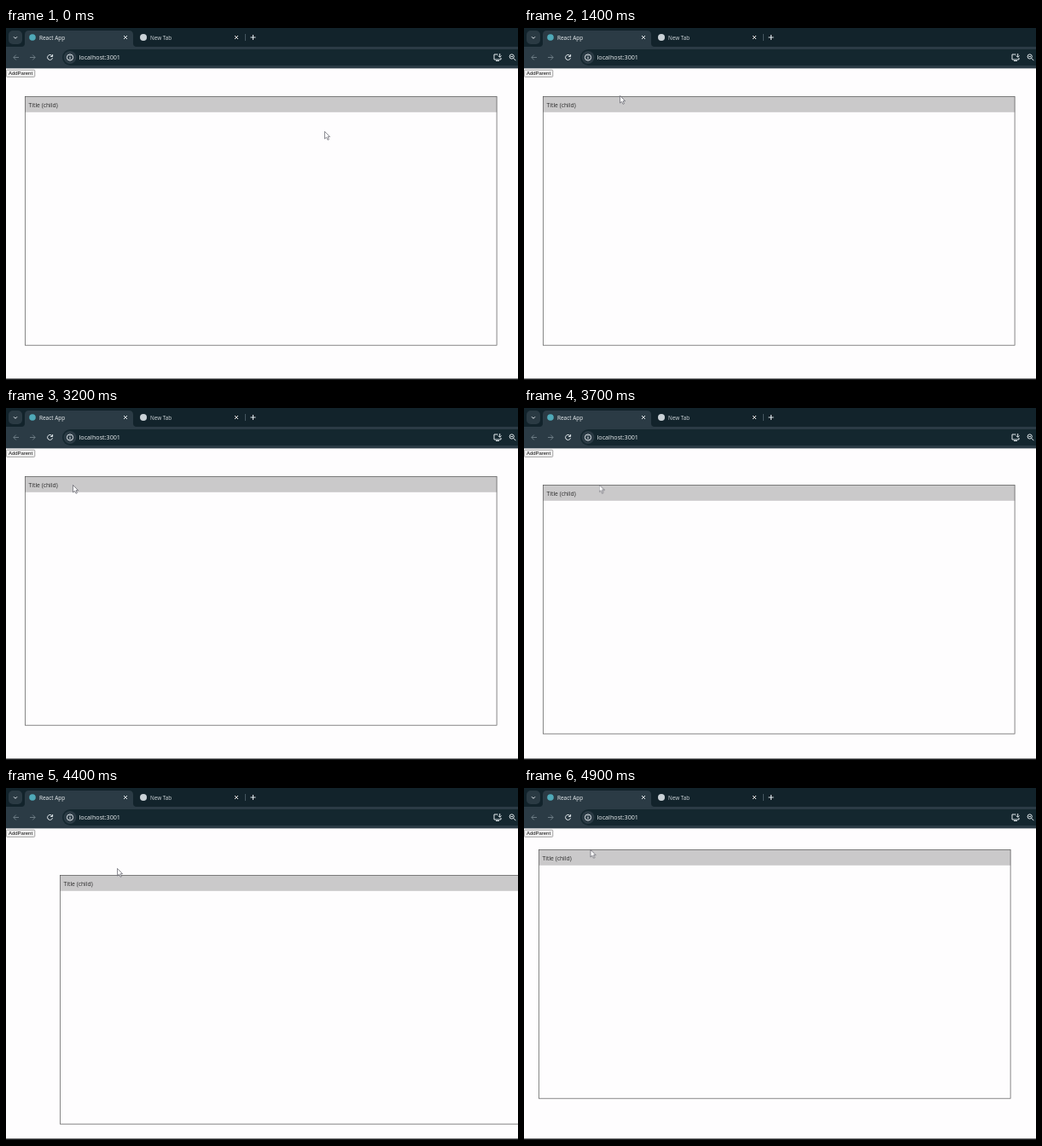
Write an HTML page that moves like this. It is 600 by 413 pixels and loops after 5 s.

```html
<!DOCTYPE html>
<html lang="en">
<head>
<meta charset="utf-8">
<title>Draggable window</title>
<style>
html, body { margin: 0; width: 100%; height: 100%; overflow: hidden; background: #fefdfe; }
svg { display: block; width: 600px; height: 413px; }
text { font-family: "Open Sans", "Noto Sans", sans-serif; }
.icon { fill: none; stroke: #e3eaee; stroke-width: 1; }
.dim { stroke: #6c7b84; }
#panel { animation: panel 5s step-end infinite; }
#cursor { animation: cursor 5s step-end infinite; }

/* 2% = one 100 ms step */
@keyframes panel {
  0%, 70% { transform: translate(22px, 80px); }
  72% { transform: translate(22px, 86px); }
  74% { transform: translate(22px, 90px); }
  76% { transform: translate(24px, 91px); }
  78% { transform: translate(28px, 92px); }
  80% { transform: translate(34px, 94px); }
  82% { transform: translate(41px, 98px); }
  84% { transform: translate(50px, 102px); }
  86% { transform: translate(58px, 104px); }
  88% { transform: translate(63px, 102px); }
  90% { transform: translate(61px, 94px); }
  92% { transform: translate(51px, 83px); }
  94% { transform: translate(37px, 74px); }
  96% { transform: translate(24px, 71px); }
  98%, 100% { transform: translate(17px, 72px); }
}
@keyframes cursor {
  0% { transform: translate(373px, 121px); }
  18% { transform: translate(369px, 120px); }
  20% { transform: translate(363px, 118px); }
  24% { transform: translate(320px, 106px); }
  26% { transform: translate(200px, 88px); }
  28% { transform: translate(112px, 79px); }
  30% { transform: translate(95px, 82px); }
  32% { transform: translate(87px, 86px); }
  34% { transform: translate(82px, 89px); }
  36% { transform: translate(80px, 91px); }
  38%, 64% { transform: translate(78px, 90px); }
  66% { transform: translate(79px, 88px); }
  68% { transform: translate(81px, 84px); }
  70% { transform: translate(82px, 84px); }
  72% { transform: translate(84px, 89px); }
  74% { transform: translate(87.5px, 89.5px); }
  76% { transform: translate(94px, 92px); }
  78% { transform: translate(101px, 95px); }
  80% { transform: translate(110px, 99px); }
  82% { transform: translate(117px, 102px); }
  84% { transform: translate(124px, 104px); }
  86% { transform: translate(129px, 101px); }
  88% { transform: translate(130px, 94px); }
  90% { transform: translate(123px, 84px); }
  92% { transform: translate(109px, 73px); }
  94% { transform: translate(94px, 67px); }
  96% { transform: translate(83px, 68px); }
  98%, 100% { transform: translate(77.5px, 72px); }
}
</style>
</head>
<body>
<svg viewBox="0 0 600 413">
  <defs>
    <path id="close" d="M-2-2 2 2M2-2-2 2"/>
  </defs>
  <rect width="600" height="413" fill="#fefdfe"/>

  <!-- tab strip -->
  <rect width="600" height="24" fill="#12232b"/>
  <rect x="3" y="3" width="16" height="16" rx="5" fill="#2a3a43"/>
  <path class="icon" d="M9 10.3l2 2 2-2"/>
  <path d="M18 22q4 0 4-4V8q0-5 5-5H144q5 0 5 5v10q0 4 4 4z" fill="#2b3b45"/>
  <circle cx="31" cy="11" r="3.8" fill="#4fa9b8"/>
  <text x="39" y="13.7" font-size="6.45" fill="#eef2f4">React App</text>
  <use href="#close" x="140" y="11" class="icon"/>
  <circle cx="161" cy="11" r="4" fill="#c9d1d6"/>
  <text x="169" y="13.7" font-size="6.3" fill="#d3dade">New Tab</text>
  <use href="#close" x="270" y="11" class="icon"/>
  <path d="M280.5 7v8" stroke="#465761"/>
  <path class="icon" d="M289.5 8v6M286.5 11h6"/>

  <!-- toolbar -->
  <rect y="22" width="600" height="25.4" fill="#2b3b45"/>
  <path class="icon dim" d="M15 34.5H9M11.8 31.5l-3 3 3 3M28 34.5h6M31.2 31.5l3 3-3 3"/>
  <path class="icon" d="M54.3 33.2a3 3 0 1 0 .2 2M54.6 31v2.5h-2.5"/>
  <rect x="66" y="25" width="560" height="19" rx="9.5" fill="#14272f"/>
  <circle cx="75" cy="34.5" r="7.5" fill="#2b3b45"/>
  <circle class="icon" cx="75" cy="34.5" r="3.6"/>
  <path class="icon" d="M75 34v2.5M75 32.3v1"/>
  <text x="85.5" y="37.1" font-size="7.2" fill="#f0f4f6">localhost:3001</text>
  <path class="icon" d="M576.5 31H572v6h8v-2M574 38.5h4M578.7 30v4M576.8 32.5l1.9 1.9 1.9-1.9"/>
  <circle class="icon" cx="592.7" cy="33.5" r="2.6"/>
  <path class="icon" d="M594.6 35.4l2.8 2.8M591.4 33.5h2.6"/>

  <!-- page -->
  <rect x=".4" y="49.2" width="33.4" height="8.2" rx="1" fill="#efefef" stroke="#858585" stroke-width=".7"/>
  <text x="3" y="55.4" font-size="5.95" fill="#111" style="font-family:'Liberation Sans',Arial,sans-serif">AddParent</text>
  <g id="panel">
    <rect x=".5" y=".4" width="552.6" height="291.8" fill="#fefdfe"/>
    <rect x=".3" y=".2" width="553" height="18.6" fill="#cac9ca"/>
    <rect x=".5" y=".4" width="552.6" height="291.8" fill="none" stroke="#555" stroke-width=".7"/>
    <text x="4.5" y="12.7" font-size="6.8" fill="#2b2b2b">Title (child)</text>
  </g>
  <rect y="411.4" width="600" height="1.6" fill="#1b1d1f"/>
  <g id="cursor">
    <path d="M.5.4V9L2.5 7.2 4 10.3 5.4 9.7 4 6.7H6.6z" fill="#fff" stroke="#50505a" stroke-width=".65" stroke-linejoin="round"/>
  </g>
</svg>
</body>
</html>
```
